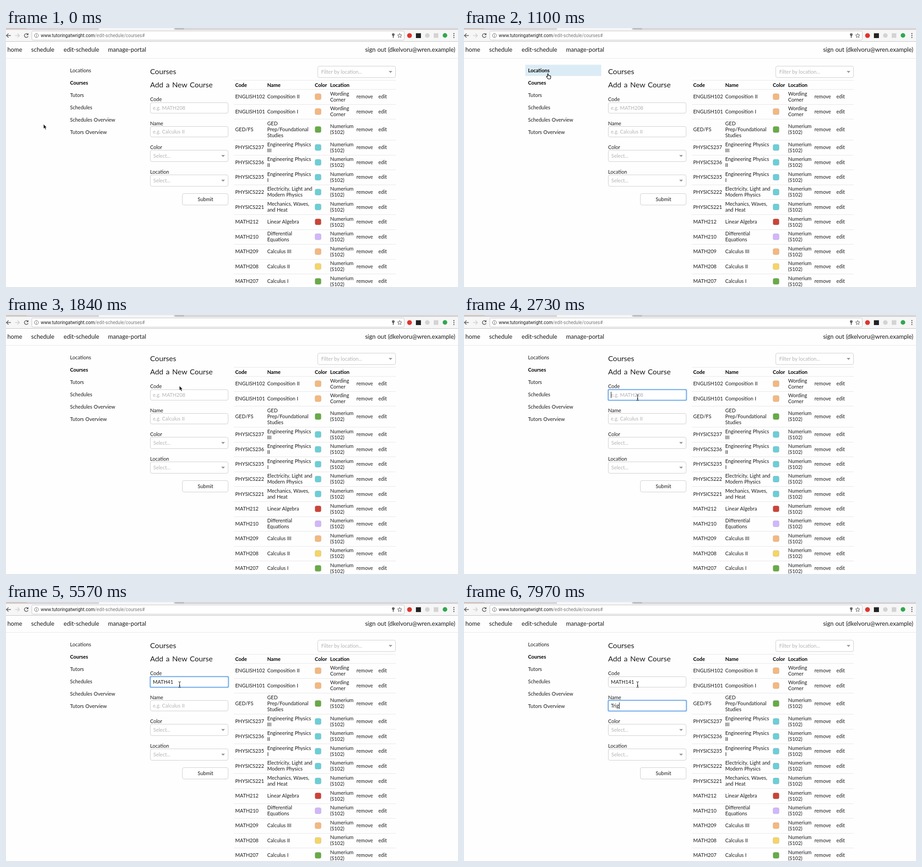
An HTML page that plays this animation: 988x567 px, repeating every 8 s.

```html
<!DOCTYPE html>
<html lang="en">
<head>
<meta charset="utf-8">
<title>Courses</title>
<style>
html, body { margin: 0; width: 100%; height: 100%; overflow: hidden; background: #fefefe; }
svg { display: block; width: 988px; height: 567px; }
text { font: 11px Lato, "Open Sans", sans-serif; word-spacing: .04em; fill: #1a1a1a; white-space: pre; }
.b { font-weight: 700; fill: #000; }
.nav { font-size: 13.1px; }
.head { font-size: 16.1px; word-spacing: .1em; }
.url { font: 10px Roboto, sans-serif; word-spacing: 0; }
.hint { fill: #b2b2b2; }
</style>
</head>
<body>
<svg id="stage" viewBox="0 0 988 567" xmlns="http://www.w3.org/2000/svg"></svg>
<script>
const NS = 'http://www.w3.org/2000/svg';
const stage = document.getElementById('stage');

function add(tag, attrs, parent = stage) {
  const el = document.createElementNS(NS, tag);
  for (const k in attrs) el.setAttribute(k, attrs[k]);
  parent.appendChild(el);
  return el;
}
function text(x, y, str, cls = '', extra = {}) {
  const el = add('text', { x, y, class: cls, ...extra });
  el.textContent = str;
  return el;
}
const rect = (x, y, width, height, fill, extra = {}) =>
  add('rect', { x, y, width, height, fill, ...extra });
const path = (d, extra = {}, parent = stage) =>
  add('path', { d, fill: 'none', ...extra }, parent);
const dot = (cx, cy, r, fill, extra = {}) => add('circle', { cx, cy, r, fill, ...extra });
const field = (x, y, w, h) => rect(x, y, w, h, '#fff', { rx: 3.5, stroke: '#cecece' });
const show = (el, on) => el.setAttribute('visibility', on ? 'visible' : 'hidden');

function drawBrowser() {
  rect(0, 0, 988, 30, '#f6f6f6');
  rect(0, 0, 203, 3, '#dcdadc');
  rect(0, 0, 45, 1.5, '#d9bfae');
  rect(367, 0, 621, 3, '#dcdadc');
  rect(0, 2.6, 203, 1, '#b9b7b9');
  rect(367, 2.6, 621, 1, '#b9b7b9');
  path('M369 0L372 3H389L387 0Z', { fill: '#c6c4c6', stroke: '#aaa', 'stroke-width': .7 });
  rect(0, 29, 988, 1, '#c4c2c4');

  const line = { stroke: '#555', 'stroke-width': 1.4 };
  path('M10.5 16.5H1.5M5.5 12L1 16.5L5.5 21', line);
  path('M20 16.5H29M25 12L29.5 16.5L25 21', { ...line, stroke: '#cfcfcf' });
  path('M48.3 18A4.2 4.2 0 1 1 47.2 13.4', line);
  path('M49 11V15.6H44.4Z', { fill: '#555' });

  rect(56.5, 6.5, 814, 20, '#fff', { rx: 3, stroke: '#c8c6c8' });
  dot(66.5, 16.5, 4.3, 'none', { stroke: '#666' });
  rect(66, 15.6, 1, 3.4, '#666');
  rect(66, 13.8, 1, 1, '#666');
  const url = text(76, 20, '', 'url');
  add('tspan', {}, url).textContent = 'www.tutoringatwright.com';
  add('tspan', { fill: '#777' }, url).textContent = '/edit-schedule/courses#';

  dot(846.5, 14.3, 2.8, '#555');
  rect(845.6, 16, 1.8, 5.5, '#555');
  rect(846, 13, 1, 1, '#fff');
  let star = '';
  for (let i = 0; i < 10; i++) {
    const a = i * Math.PI / 5, r = i % 2 ? 2.3 : 5;
    star += (i ? 'L' : 'M') + (860.5 + r * Math.sin(a)) + ' ' + (16.8 - r * Math.cos(a));
  }
  path(star + 'Z', { stroke: '#555' });
  dot(882, 16.5, 5.2, '#e0342c');
  rect(896, 11.5, 11, 10.5, '#222');
  dot(921, 16.5, 5, '#d3d3d3');
  rect(935, 11.5, 10, 10, '#d3d3d3');
  dot(959.5, 16.3, 5, '#2fa84f');
  for (const y of [12.3, 16.5, 20.7]) dot(979, y, 1.2, '#555');
}

function drawNav() {
  rect(0, 30, 988, 36, '#fefefe');
  rect(0, 66, 988, 1, '#e8e8e8');
  [[3, 'home'], [55, 'schedule'], [126, 'edit-schedule'], [223, 'manage-portal']]
    .forEach(([x, s]) => text(x, 52, s, 'nav'));
  text(982, 52, 'sign out (dkelvoru@wren.example)', 'nav', { 'text-anchor': 'end' });
}

function drawSelect(x, y, w, label, pad) {
  field(x, y, w, 25);
  text(x + pad, y + 16.5, label, 'hint');
  path(`M${x + w - 15} ${y + 10.5}h8l-4 4.5z`, { fill: '#999' });
}

function drawForm() {
  text(315, 101, 'Courses', 'head');
  text(315, 130, 'Add a New Course', 'head');
  text(315, 160, 'Code');
  text(315, 213, 'Name');
  text(315, 265, 'Color');
  text(315, 319, 'Location');
  drawSelect(315.5, 267.5, 170, 'Select...', 6.5);
  drawSelect(315.5, 321.5, 170, 'Select...', 6.5);
  drawSelect(681.5, 83.5, 170, 'Filter by location...', 7.5);
  field(385.5, 362.5, 100, 25);
  text(436, 379, 'Submit', '', { 'text-anchor': 'middle' });
}

const ORANGE = '#f4b77f', GREEN = '#68aa47', CYAN = '#6bced6';
const COURSES = [
  ['ENGLISH102', 'Composition II', ORANGE],
  ['ENGLISH101', 'Composition I', ORANGE],
  ['GED/FS', 'GED|Prep/Foundational|Studies', GREEN],
  ['PHYSICS237', 'Engineering Physics|III', CYAN],
  ['PHYSICS236', 'Engineering Physics|II', CYAN],
  ['PHYSICS235', 'Engineering Physics|I', CYAN],
  ['PHYSICS222', 'Electricity, Light and|Modern Physics', CYAN],
  ['PHYSICS221', 'Mechanics, Waves,|and Heat', CYAN],
  ['MATH212', 'Linear Algebra', '#cb4338'],
  ['MATH210', 'Differential|Equations', '#d0b6fb'],
  ['MATH209', 'Calculus III', ORANGE],
  ['MATH208', 'Calculus II', '#f6d465'],
  ['MATH207', 'Calculus I', GREEN]
];

function cell(x, mid, str) {
  const lines = str.split('|');
  lines.forEach((s, i) => text(x, Math.round(mid + 3.6 + 13 * (i - (lines.length - 1) / 2)), s));
}

function drawTable() {
  const rule = y => rect(498, Math.round(y), 354, 1, '#e7e7e7');
  rule(114);
  [[501, 'Code'], [571, 'Name'], [675, 'Color'], [708.5, 'Location']]
    .forEach(([x, s]) => text(x, 128.5, s, 'b'));
  let y = 134;
  COURSES.forEach(([code, name, color], i) => {
    const h = name.split('|').length > 2 ? 46 : 32.57;
    const mid = y + h / 2 + .2;
    rule(y);
    cell(501, mid, code);
    cell(571, mid, name);
    rect(675.4, mid - 6.8, 13.4, 13.4, color, { rx: 3.5, stroke: '#999', 'stroke-opacity': .4, 'stroke-width': .8 });
    cell(708.5, mid, i < 2 ? 'Wording|Corner' : 'Numerium|(S102)');
    cell(766, mid, 'remove');
    cell(814, mid, 'edit');
    y += h;
  });
}

function makeInput(y, hint) {
  field(315.5, y, 170, 23);
  const ring = rect(315.2, y - .2, 171, 23.4, 'none', { rx: 2, stroke: '#80b5ee', 'stroke-width': 2.6 });
  const ghost = text(321, y + 15.5, hint, 'hint');
  const value = text(321, y + 15.5, '');
  const caret = rect(321, y + 4.5, 1, 14, '#111');
  return (str, focus, blink) => {
    show(ring, focus);
    show(ghost, !str);
    value.textContent = str;
    caret.setAttribute('x', Math.round(321 + (str ? value.getComputedTextLength() : 0)));
    show(caret, focus && blink);
  };
}

function makeMenu() {
  const items = ['Locations', 'Courses', 'Tutors', 'Schedules', 'Schedules Overview', 'Tutors Overview'];
  const bar = rect(134, 0, 166, 24.5, '#dcecf6');
  const labels = items.map((s, i) => text(140, 96.5 + 27 * i, s));
  return hover => {
    show(bar, hover >= 0);
    bar.setAttribute('y', 80.5 + 27 * hover);
    labels.forEach((el, i) => el.setAttribute('class', i === 1 || i === hover ? 'b' : ''));
  };
}

function makePointers() {
  const arrow = add('g'), hand = add('g'), beam = add('g');
  path('M0 0V10L2.3 8L4 12L5.8 11.2L4.2 7.4H7.2Z',
    { fill: '#000', stroke: '#fff', 'stroke-width': .8 }, arrow);
  path('M2.5 7V1.2Q3.4 -.2 4.3 1.2V4.5Q5.6 3.8 6.2 5Q7.5 4.4 8 5.5Q9.6 5 9.6 6.6V9L8.5 12H3.8L.6 8Q-.2 6.2 1.3 6.1Z',
    { fill: '#fff', stroke: '#000', 'stroke-width': 1.1, 'stroke-linejoin': 'round' }, hand);
  path('M-2.5 .5Q0 .5 0 2.5V11Q0 13 -2.5 13M2.5 .5Q0 .5 0 2.5M0 11Q0 13 2.5 13M-1.5 9H1.5',
    { stroke: '#111' }, beam);
  const all = { arrow, hand, beam };
  return (kind, x, y) => {
    for (const k in all) show(all[k], k === kind);
    all[kind].setAttribute('transform', `translate(${x} ${y})`);
  };
}

drawBrowser();
drawNav();
drawForm();
drawTable();
const setMenu = makeMenu();
const setCode = makeInput(163.5, 'e.g. MATH208');
const setName = makeInput(215.5, 'e.g. Calculus II');
const setPointer = makePointers();

// time, pointer, x, y, hovered menu item
const MOVES = [
  [0, 'arrow', 82, 210.5, -1],
  [150, 'arrow', 112, 165, -1],
  [350, 'arrow', 135, 107, -1],
  [800, 'hand', 160, 98, 0],
  [950, 'hand', 176, 97, 0],
  [1100, 'hand', 180, 99.5, 0],
  [1250, 'hand', 181, 124, 1],
  [1400, 'hand', 182.5, 152, 2],
  [1550, 'hand', 246, 151, 2],
  [1690, 'arrow', 345, 154, -1],
  [1840, 'arrow', 379, 155, -1],
  [1990, 'arrow', 379, 158, -1],
  [2140, 'beam', 379.5, 165, -1],
  [2290, 'beam', 379.5, 170, -1],
  [2440, 'beam', 379.5, 174, -1]
];

// time, code, name, focused field, caret
const TYPING = [
  [0, '', '', '', 0],
  [2730, '', '', 'code', 1],
  [3180, '', '', 'code', 0],
  [3620, 'M', '', 'code', 1],
  [3770, 'MA', '', 'code', 1],
  [3920, 'MAT', '', 'code', 1],
  [4070, 'MATH', '', 'code', 1],
  [4520, 'MATH', '', 'code', 0],
  [4970, 'MATH41', '', 'code', 1],
  [5570, 'MATH41', '', 'code', 0],
  [5720, 'MATH4', '', 'code', 1],
  [5870, 'MATH', '', 'code', 1],
  [6170, 'MATH1', '', 'code', 1],
  [6320, 'MATH14', '', 'code', 1],
  [6470, 'MATH141', '', 'code', 1],
  [6920, 'MATH141', '', 'name', 1],
  [7370, 'MATH141', '', 'name', 0],
  [7520, 'MATH141', 'T', 'name', 1],
  [7670, 'MATH141', 'Tr', 'name', 1],
  [7820, 'MATH141', 'Tri', 'name', 1],
  [7970, 'MATH141', 'Trig', 'name', 1]
];

const at = (list, t) => list.filter(k => k[0] <= t).pop();

function render(t) {
  const [, kind, x, y, hover] = at(MOVES, t);
  const [, code, name, focus, blink] = at(TYPING, t);
  setPointer(kind, x, y);
  setMenu(hover);
  setCode(code, focus === 'code', blink);
  setName(name, focus === 'name', blink);
}

const start = performance.now();
function tick() {
  render((performance.now() - start) % 8000);
  requestAnimationFrame(tick);
}
tick();
</script>
</body>
</html>
```
